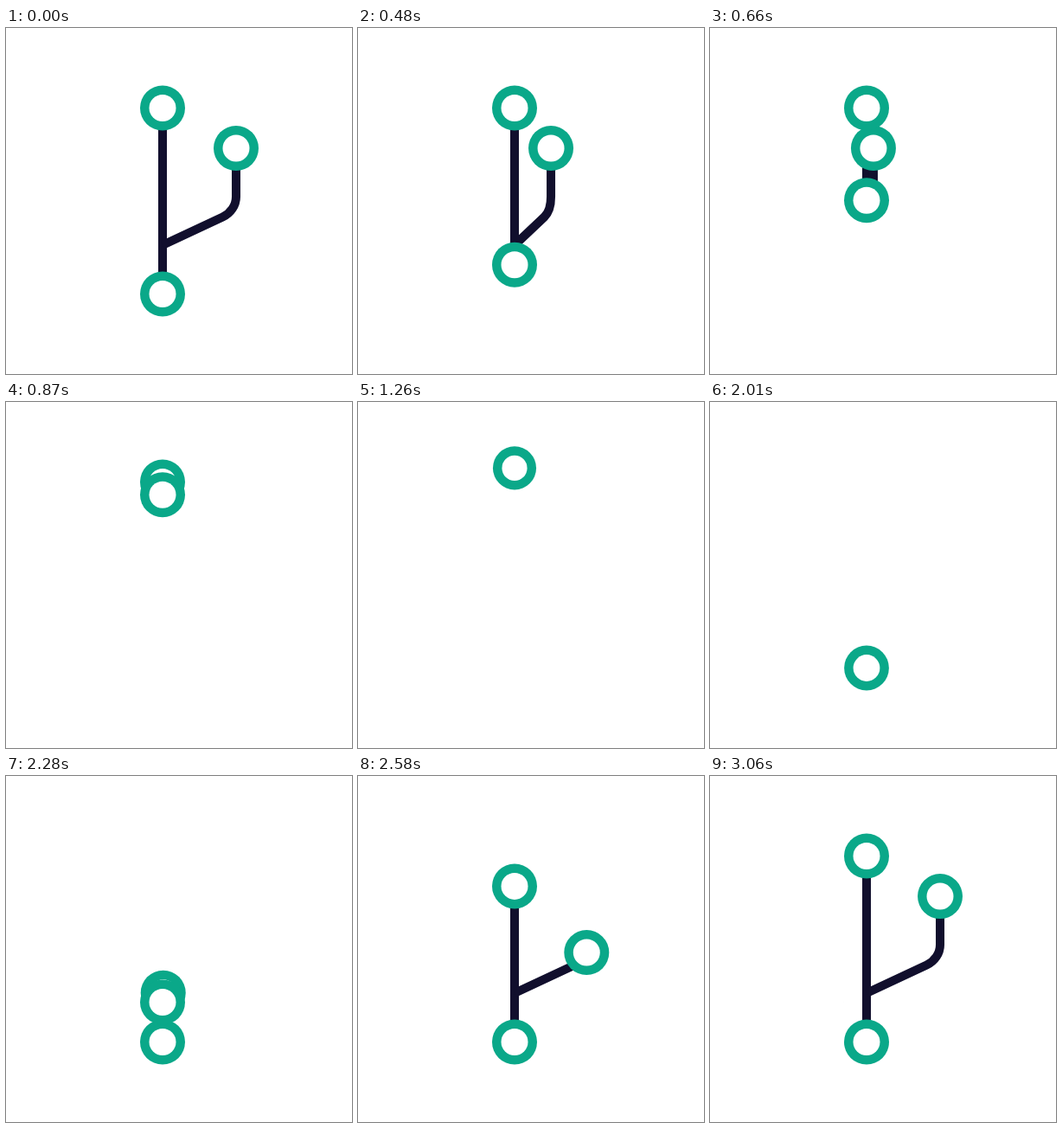
An HTML page without scripts for the animation above (3090 ms loop, 400 by 400 pixels).

```html
<!DOCTYPE html>
<html lang="en">
<head>
<meta charset="utf-8">
<title>Branch loop</title>
<style>
@property --r { syntax: "<length>"; inherits: true; initial-value: 20.75px; }

html, body { margin: 0; width: 100%; height: 100%; overflow: hidden; background: #fff; }
svg { display: block; width: 100vw; height: 100vh; }

svg * { animation: 3090ms linear infinite; }
.line { fill: none; stroke: #110f2d; stroke-width: 10; }
.rim { fill: #0aa889; r: calc(var(--r) + 5.25px); }
.hole { fill: #fff; r: max(var(--r) - 5.25px, 5.25px - var(--r)); }

.trunk { animation-name: trunk, trunk-show; }
.branch { stroke-dasharray: 1 1; animation-name: branch, draw, side-show; }
.side {
  offset-path: path("M181 251L250.5 218.5C260 214 266 205 266 195V139");
  offset-distance: 100%;
  offset-rotate: 0deg;
  animation-name: slide, travel, side-show;
}
.base { translate: 181px 307.5px; animation-name: swell, base-show; }
.top { translate: 181px 92.5px; animation-name: climb, trunk-show; }
.cover { fill: #fff; animation-name: lift, lifted-show; }
.lifted { animation-name: lift, shrink, lifted-show; }

/* The lower ring sweeps up and shrinks away */
@keyframes lift {
  0% { translate: 181px 307.5px; animation-timing-function: cubic-bezier(.753, 0, .263, 1); }
  42.98%, 100% { translate: 181px 76px; }
}
@keyframes shrink {
  0% { --r: 20.75px; }
  33.98% { --r: 20.75px; animation-timing-function: cubic-bezier(.753, 0, .263, 1); }
  63.11%, 100% { --r: 0px; }
}
@keyframes lifted-show {
  0% { visibility: visible; animation-timing-function: step-end; }
  62%, 100% { visibility: hidden; }
}

/* A new lower ring grows */
@keyframes swell {
  0% { --r: 0px; }
  36.89% { --r: 0px; animation-timing-function: cubic-bezier(.753, 0, .263, 1); }
  67.96%, 100% { --r: 20.75px; }
}
@keyframes base-show {
  0% { visibility: hidden; animation-timing-function: step-end; }
  41.75%, 100% { visibility: visible; }
}

/* Trunk and upper ring */
@keyframes trunk {
  0% { d: path("M181 92.5L181 307.5"); animation-timing-function: cubic-bezier(.753, 0, .263, 1); }
  42.98% { d: path("M181 92.5L181 76"); animation-timing-function: step-end; }
  60.19% { d: path("M181 307.5L181 307.5"); animation-timing-function: cubic-bezier(.636, 0, .19, 1); }
  100% { d: path("M181 92.5L181 307.5"); }
}
@keyframes climb {
  0% { translate: 181px 92.5px; animation-timing-function: step-end; }
  60.19% { translate: 181px 307.5px; animation-timing-function: cubic-bezier(.636, 0, .19, 1); }
  100% { translate: 181px 92.5px; }
}
@keyframes trunk-show {
  0% { visibility: visible; animation-timing-function: step-end; }
  31.23% { visibility: hidden; animation-timing-function: step-end; }
  67.96%, 100% { visibility: visible; }
}

/* Side branch and its ring */
@keyframes branch {
  0% {
    d: path("M181 251L250.5 218.5C260 214 266 205 266 195L266 139");
    animation-timing-function: cubic-bezier(.753, 0, .263, 1);
  }
  30.68% {
    d: path("M181 251L181 218.5C181 214 181 205 181 195L181 139");
    animation-timing-function: step-end;
  }
  72.82%, 100% { d: path("M181 251L250.5 218.5C260 214 266 205 266 195L266 139"); }
}
@keyframes draw {
  0% { stroke-dashoffset: 0; animation-timing-function: step-end; }
  72.82% { stroke-dashoffset: 1; animation-timing-function: cubic-bezier(.312, 0, .271, 1); }
  100% { stroke-dashoffset: 0; }
}
@keyframes slide {
  0% { translate: 0px 0px; animation-timing-function: cubic-bezier(.753, 0, .263, 1); }
  30.68% { translate: -85px 0px; animation-timing-function: step-end; }
  72.82%, 100% { translate: 0px 0px; }
}
@keyframes travel {
  0% { offset-distance: 100%; animation-timing-function: step-end; }
  72.82% { offset-distance: 0%; animation-timing-function: cubic-bezier(.312, 0, .271, 1); }
  100% { offset-distance: 100%; }
}
@keyframes side-show {
  0% { visibility: visible; animation-timing-function: step-end; }
  24.76% { visibility: hidden; animation-timing-function: step-end; }
  72.83%, 100% { visibility: visible; }
}
</style>
</head>
<body>
<svg viewBox="0 0 400 400">
  <path class="line trunk" d="M181 92.5L181 307.5"/>
  <path class="line branch" pathLength="1" d="M181 251L250.5 218.5C260 214 266 205 266 195L266 139"/>
  <rect class="cover" x="-30" width="80" height="240"/>
  <g class="side"><circle class="rim"/><circle class="hole"/></g>
  <g class="base"><circle class="rim"/><circle class="hole"/></g>
  <g class="top"><circle class="rim"/><circle class="hole"/></g>
  <g class="lifted"><circle class="rim"/><circle class="hole"/></g>
</svg>
</body>
</html>
```
